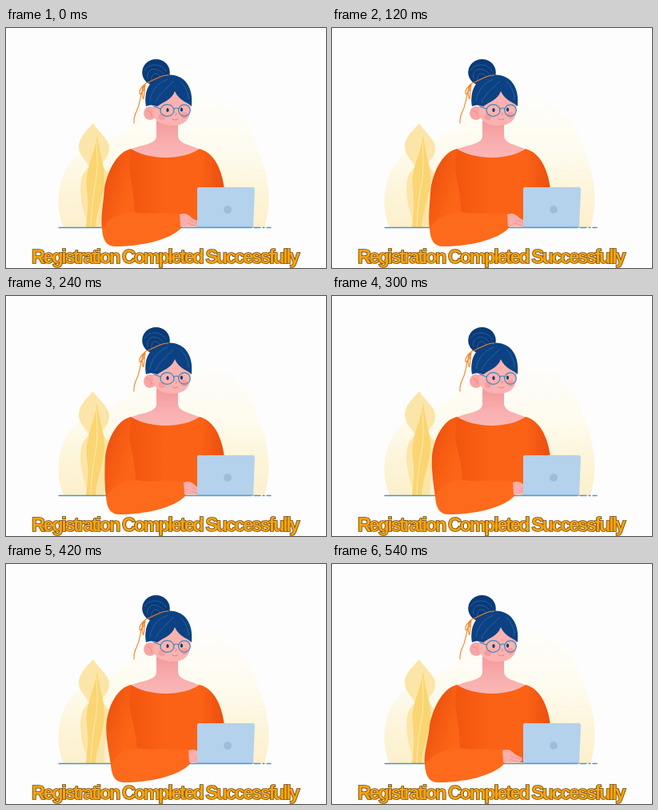
Recreate the animation shown at these times as an HTML page. Size 400x300 px, loop 0.6 s.

```html
<!DOCTYPE html>
<html lang="en">
<head>
<meta charset="utf-8">
<title>Registration completed</title>
<style>
html, body { margin: 0; width: 100%; height: 100%; overflow: hidden; background: #fdfdfd; }
svg { display: block; width: 400px; height: 300px; }
.line { fill: none; stroke-linecap: round; stroke-linejoin: round; }
text {
  font: bold 23.5px "Liberation Sans", Arial, sans-serif;
  letter-spacing: -2.35px;
  fill: #f7a30f; stroke: #66440f; stroke-width: 1.6px; paint-order: stroke;
}
</style>
</head>
<body>
<svg viewBox="0 0 400 300">
  <defs>
    <linearGradient id="glow" x2="0" y2="1">
      <stop stop-color="#fdfdfb"/><stop offset=".45" stop-color="#fefbee"/>
      <stop offset=".75" stop-color="#fdf4d8"/><stop offset="1" stop-color="#fcefcc"/>
    </linearGradient>
    <linearGradient id="sweater" gradientUnits="userSpaceOnUse" x1="158" y1="0" x2="272" y2="0">
      <stop stop-color="#f3560f"/><stop offset=".35" stop-color="#fb6215"/>
      <stop offset=".75" stop-color="#fb6215"/><stop offset="1" stop-color="#ea4f10"/>
    </linearGradient>
    <linearGradient id="sleeve" gradientUnits="userSpaceOnUse" x1="124" y1="180" x2="160" y2="192">
      <stop stop-color="#e9500f"/><stop offset=".5" stop-color="#f65c12"/><stop offset="1" stop-color="#fc6515"/>
    </linearGradient>
    <linearGradient id="skin" x2="0" y2="1">
      <stop stop-color="#f39a9c"/><stop offset=".6" stop-color="#f9b0b0"/><stop offset="1" stop-color="#fbb8b6"/>
    </linearGradient>
  </defs>

  <path fill="url(#glow)" d="M72 249C61 224 64 190 80 168C97 144 137 145 158 119C178 92 216 80 249 83C282 87 299 108 311 140C321 166 337 206 323 249Z"/>

  <!-- plant -->
  <path fill="#fce5a8" d="M109 119C100 129 90 138 91 150C92 161 101 166 104 174C93 182 92 196 94 214C96 229 101 238 102 249H122L128 182Q123 176 119 169C126 163 130 156 129 148C127 137 115 129 109 119Z"/>
  <path fill="#fad571" d="M114 134C111 152 106 162 102 180C98 196 104 210 102 228Q101 240 100 249H112C112 232 122 212 123 190C124 172 116 156 114 134Z"/>
  <path class="line" stroke="#fdebb9" stroke-width=".9" d="M113 142C114 160 115 174 112 194Q107 218 106 248"/>

  <!-- desk -->
  <path class="line" stroke="#4f92c4" stroke-width="1.3" d="M66 249.500H307M310 249.500H318M321 249.500H323M326 249.500H331"/>

  <!-- neck and torso -->
  <path fill="url(#skin)" d="M188 116H215V135C216 145 231 146 243 152C222 170 178 170 155 152C167 146 188 146 188 135Z"/>
  <path fill="url(#sweater)" d="M156 151C179 165.500 221 165.500 242 151C261 156 270 178 273 201V248H148L146 160Z"/>
  <path id="upper" fill="url(#sleeve)"/>
  <path id="forearm" fill="#fd6a1b"/>
  <g id="hand">
    <path fill="#fbaeac" d="M0 233C8 230 12 234 16 238L24 242Q26 246 21 248H1Z"/>
    <path class="line" stroke="#ef8c8b" stroke-width=".8" d="M11 240L22 244M10 244L19 247"/>
  </g>

  <!-- laptop -->
  <path fill="#b4d2ec" d="M241 199H308Q311 199 311 202L309 249H239V201Q239 199 241 199Z"/>
  <path class="line" stroke="#6ba4d2" stroke-width="1.2" d="M238 249H309"/>
  <circle cx="277" cy="227" r="5" fill="#9dbddb"/>

  <!-- head -->
  <ellipse cx="180" cy="106.500" rx="8" ry="8.500" fill="#f9a5a5"/>
  <path class="line" stroke="#f08688" d="M176 103Q182 104 182 110"/>
  <path fill="#fbb2b0" d="M183 88C187 76 207 72 218 77C230 81 232 94 230 106C228 118 219 122 208 122C194 122 186 116 184 107Z"/>
  <circle cx="195" cy="111" r="4" fill="#f58389" opacity=".5"/>
  <circle cx="223" cy="109" r="4" fill="#f58389" opacity=".5"/>
  <ellipse cx="187.500" cy="55.500" rx="17.300" ry="16.500" fill="#0a3b78"/>
  <path fill="#0c4283" d="M175 98C172 79 179 63 198 59C221 55 235 72 232 98C228 93 216 91 211 79C207 90 197 92 189 98C184 96 179 96 175 98Z"/>
  <g class="line" stroke="#2f70ae" stroke-width=".7">
    <path d="M173 53C179 43 195 44 200 54M177 63C174 51 188 47 196 57M182 65C181 56 188 54 193 61"/>
    <path d="M180 91C182 77 191 68 202 64M187 93C191 82 202 75 209 67M218 67C225 73 228 82 228 89"/>
  </g>
  <path class="line" stroke="#f5821f" stroke-width="1.100" d="M203 59C194 58 186 65 175 69C170 73 166 78 167 82C168 84 176 74 173 72C168 74 171 91 172 88C173 82 173 76 174 71C167 81 169 88 166 96C165 103 159 108 160 119"/>
  <g class="line" stroke="#3b86c1" stroke-width="1.200">
    <ellipse cx="201.500" cy="103" rx="8.500" ry="7.300"/>
    <ellipse cx="223" cy="103" rx="7.300" ry="7.200"/>
    <path d="M210 101Q213 99 215.700 101M193 101L185 98"/>
  </g>
  <g fill="#123b67">
    <ellipse cx="202" cy="102.500" rx="1.600" ry="2.500"/>
    <ellipse cx="219.500" cy="102" rx="1.600" ry="2.500"/>
  </g>
  <path class="line" stroke="#ee7778" stroke-width=".9" d="M212 106Q215 108 212 109M208 114Q211 116 215 114"/>

  <text x="32" y="294">Registration Completed Successfully</text>
</svg>
<script>
const STEP = 60;
const wristX = [217, 218, 219, 220.5, 222, 226, 228, 228, 222, 213];
const [upper, forearm, hand] = ["upper", "forearm", "hand"].map(id => document.getElementById(id));

// The sleeve leans and the elbow follows the wrist.
function pose(wrist) {
  const swing = wrist - 217;
  const sleeve = 123 + swing * .22;
  const elbow = 120 + swing;
  const fold = 161 + swing * .25;
  upper.setAttribute("d", `M156 151C140 155 128 175 ${sleeve} 200
    C${sleeve - 1} 218 ${elbow - 2} 236 ${elbow} 251L${fold} 232C${fold} 213 157 195 154 178Z`);
  forearm.setAttribute("d", `M${elbow} 251C${elbow + 1} 266 ${elbow + 6} 273 ${elbow + 17} 273
    C${elbow + 46} 273 ${wrist - 12} 266 ${wrist + 3} 249Q${wrist - 1} 240 ${wrist + 1} 232
    C${wrist - 20} 230 ${fold + 20} 233 ${fold} 230C${fold - 15} 231 ${elbow + 9} 236 ${elbow} 251Z`);
  hand.setAttribute("transform", `translate(${wrist} 0)`);
}

function draw() {
  pose(wristX[Math.floor(performance.now() / STEP) % wristX.length]);
  requestAnimationFrame(draw);
}
draw();
</script>
</body>
</html>
```
